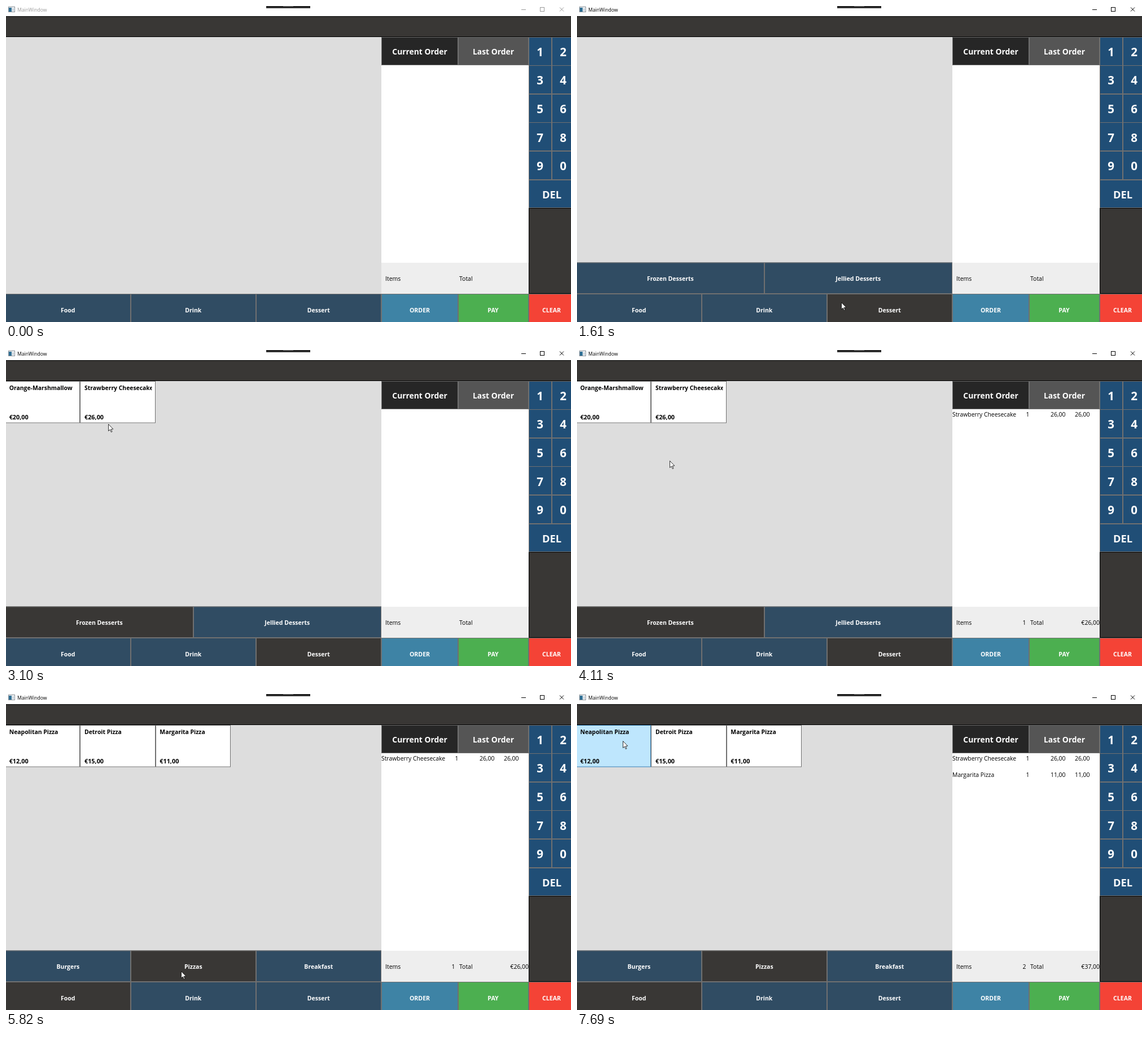
These frames come from a looping animation (1001 by 560 pixels, 8000 ms). An HTML page with a canvas:

```html
<!DOCTYPE html>
<html lang="en">
<head>
<meta charset="utf-8">
<title>Order screen</title>
<style>
html, body { margin: 0; width: 100%; height: 100%; overflow: hidden; background: #fff; }
canvas { display: block; width: 1001px; height: 560px; }
</style>
</head>
<body>
<canvas id="stage" width="1001" height="560"></canvas>
<script>
const ctx = document.getElementById('stage').getContext('2d');
const LOOP = 8000;
const TICK = 78;
const HOVER_LAG = 50;
const FAMILY = '"Open Sans", "Noto Sans", sans-serif';

const DARK = '#393735', SLATE = '#304c63', NAVY = '#204e76', EDGE = '#707070';
const NORMAL = { fill: '#fff', edge: EDGE };
const HOVER = { fill: '#bee6fd', edge: '#3c7fb1' };
const PRESSED = { fill: '#c4e5f6', edge: '#2c628b' };

// The pointer enters here, then glides to each stop; a higher power slows its arrival
const ENTRY = { x: 930, y: 545 };
const MOVES = [
  { from: 360, to: 590, x: 524, y: 530, power: 1 },
  { from: 1610, to: 1840, x: 247, y: 503, power: 0.78 },
  { from: 2070, to: 2230, x: 233, y: 486, power: 1.6 },
  { from: 2690, to: 3250, x: 175, y: 88, power: 1.6 },
  { from: 4030, to: 4730, x: 132, y: 527, power: 1.27 },
  { from: 5270, to: 5600, x: 310, y: 491, power: 1.6 },
  { from: 6050, to: 6610, x: 315, y: 86, power: 1.6 },
  { from: 7310, to: 7690, x: 81, y: 83, power: 1.4 }
];

const DESSERTS = [['Orange-Marshmallow', 20], ['Strawberry Cheesecake', 26]];
const PIZZAS = [['Neapolitan Pizza', 12], ['Detroit Pizza', 15], ['Margarita Pizza', 11]];

const between = (t, a, b) => t >= a && t < b;
const inside = (p, x, y, w, h) => p && between(p.x, x, x + w) && between(p.y, y, y + h);
const money = n => n + ',00';

function pointerAt(t) {
  if (t < MOVES[0].from) return null;
  let pos = ENTRY;
  for (const move of MOVES) {
    if (t < move.from) break;
    const steps = Math.round((move.to - move.from) / TICK) + 1;
    const gap = (move.to - move.from) / (steps - 1);
    const p = Math.min(1, (Math.floor((t - move.from) / gap) + 1) / steps);
    const eased = 1 - (1 - p) ** move.power;
    pos = {
      x: Math.round(pos.x + (move.x - pos.x) * eased),
      y: Math.round(pos.y + (move.y - pos.y) * eased)
    };
  }
  return pos;
}

function rect(x, y, w, h, fill) {
  ctx.fillStyle = fill;
  ctx.fillRect(x, y, w, h);
}

function box(x, y, w, h, fill, edge = EDGE) {
  rect(x, y, w, h, fill);
  ctx.strokeStyle = edge;
  ctx.lineWidth = 1;
  ctx.strokeRect(x + 0.5, y + 0.5, w - 1, h - 1);
}

function text(str, x, y, size, { color = '#000', weight = 400, align = 'left' } = {}) {
  ctx.font = `${weight} ${size}px ${FAMILY}`;
  ctx.textAlign = align;
  ctx.fillStyle = color;
  ctx.fillText(str, x, y);
}

function button(label, x, y, w, h, fill, size, cx, cy, edge) {
  box(x, y, w, h, fill, edge);
  text(label, cx, cy + size * 0.36, size, { color: '#fff', weight: 700, align: 'center' });
}

function titleBar(active) {
  rect(0, 0, 1001, 18, '#fff');
  rect(0, 18, 1001, 37, '#000');
  rect(0, 19, 1001, 35, DARK);
  box(4, 1, 12, 10, '#f4f6f8', '#8a9299');
  rect(5, 3, 5, 7, '#2f6f94');
  rect(11, 4, 3, 5, '#c9d3da');
  const ink = active ? '#000' : '#999';
  text('MainWindow', 20, 9.7, 8.65, { color: ink });
  rect(913, 6, 8, 1, ink);
  ctx.strokeStyle = ink;
  ctx.lineWidth = 1;
  ctx.strokeRect(946.5, 2.5, 7, 7);
  ctx.beginPath();
  ctx.moveTo(981, 2.5); ctx.lineTo(988, 9.5);
  ctx.moveTo(988, 2.5); ctx.lineTo(981, 9.5);
  ctx.stroke();
  rect(461, 0, 78, 4, '#2b2b2b');
  rect(491, 0, 18, 1, '#777');
}

function keypad() {
  box(926, 358, 80, 152, DARK, '#000');
  const pitch = 50.6;
  for (let i = 0; i < 10; i++) {
    const col = i % 2, row = i >> 1;
    const top = Math.floor(55 + row * pitch);
    button(String((i + 1) % 10), 926 + col * 41, top, 41, 51, NAVY, 20.5, 946 + col * 41, 81.5 + row * pitch);
  }
  button('DEL', 926, 308, 82, 50, NAVY, 18.3, 967, 334);
}

function tiles(list, t, hoverPos) {
  const edge = i => Math.round(i * 133.33 - 2);
  list.forEach(([name, price], i) => {
    const x = edge(i), w = edge(i + 1) - x;
    const down = (i === 1 && between(t, 3400, 3550)) || (i === 2 && between(t, 6990, 7065));
    const look = down ? PRESSED : inside(hoverPos, x, 55, w, 74) ? HOVER : NORMAL;
    box(x, 55, w, 74.5, look.fill, look.edge);
    const left = 5.7 + i * 133.33;
    ctx.save();
    ctx.beginPath();
    ctx.rect(left, 56, 119.5, 72);
    ctx.clip();
    text(name, left, 70.5, 10.4, { weight: 700 });
    text('€' + money(price), left, 122.5, 10.8, { weight: 700 });
    ctx.restore();
  });
}

function buttonRow(labels, y, h, cy, chosen) {
  const pitch = 666 / labels.length;
  const edge = i => Math.floor(i * pitch - 1);
  labels.forEach((label, i) =>
    button(label, edge(i), y, edge(i + 1) - edge(i), h,
      i === chosen ? DARK : SLATE, 10.5, (i + 0.5) * pitch - 1.2, cy));
}

function categories(t) {
  const group = t >= 4890 ? 0 : t >= 980 ? 2 : -1;
  buttonRow(['Food', 'Drink', 'Dessert'], 510, 54, 539, group);
  if (t >= 4960) {
    buttonRow(['Burgers', 'Pizzas', 'Breakfast'], 454.5, 55.5, 483, t >= 5740 ? 1 : -1);
  } else if (t >= 980) {
    buttonRow(['Frozen Desserts', 'Jellied Desserts'], 454.5, 55.5, 483, t >= 2310 ? 0 : -1);
  }
}

function order(t) {
  rect(665, 105, 261, 350, '#fff');
  rect(665, 455, 261, 55, '#eee');
  button('Current Order', 665, 55, 136, 50, '#262626', 13.85, 733, 81);
  button('Last Order', 801, 55, 125, 50, '#555', 13.85, 863.5, 81);
  text('Items', 672, 487, 10.5);
  text('Total', 803, 487, 10.5);

  const rows = [];
  if (t >= 3550) rows.push(DESSERTS[1]);
  if (t >= 7065) rows.push(PIZZAS[2]);
  if (!rows.length) return;
  rows.forEach(([name, price], i) => {
    const y = 117.5 + i * 29.6;
    text(name, 665, y, 10.4);
    text('1', 795.5, y, 10.5);
    text(money(price), 839, y, 10.5);
    text(money(price), 882, y, 10.5);
  });
  const sum = rows.reduce((total, row) => total + row[1], 0);
  text(String(rows.length), 795.5, 487, 10.5, { align: 'right' });
  text('€' + money(sum), 926, 487, 10.5, { align: 'right' });
}

function actions(hoverPos) {
  const draw = (label, x, w, fill, cx) => {
    const look = inside(hoverPos, x, 510, w, 50) ? HOVER : { fill, edge: EDGE };
    button(label, x, 510, w, 54, look.fill, 10.6, cx, 539, look.edge);
  };
  draw('ORDER', 665, 136, '#3e83a5', 733);
  draw('PAY', 801, 125, '#4caf50', 863);
  draw('CLEAR', 926, 82, '#f44336', 966.5);
}

function pointer(pos) {
  if (!pos) return;
  ctx.save();
  ctx.translate(pos.x + 0.5, pos.y + 0.5);
  ctx.beginPath();
  [[0, 0], [0, 12], [2.8, 9.5], [4.8, 14], [6.5, 13.2], [4.6, 8.9], [8.3, 8.6]]
    .forEach(([x, y]) => ctx.lineTo(x, y));
  ctx.closePath();
  ctx.fillStyle = '#fff';
  ctx.fill();
  ctx.strokeStyle = '#000';
  ctx.lineWidth = 0.8;
  ctx.stroke();
  ctx.restore();
}

function render(t) {
  const hoverPos = pointerAt(t - HOVER_LAG);
  titleBar(t >= 900);
  rect(0, 55, 665, 455, '#ddd');
  order(t);
  keypad();
  if (t >= 2390) tiles(t >= 5820 ? PIZZAS : DESSERTS, t, hoverPos);
  categories(t);
  actions(hoverPos);
  pointer(pointerAt(t));
}

const began = performance.now();
function tick() {
  render((performance.now() - began) % LOOP);
  requestAnimationFrame(tick);
}
tick();
</script>
</body>
</html>
```
